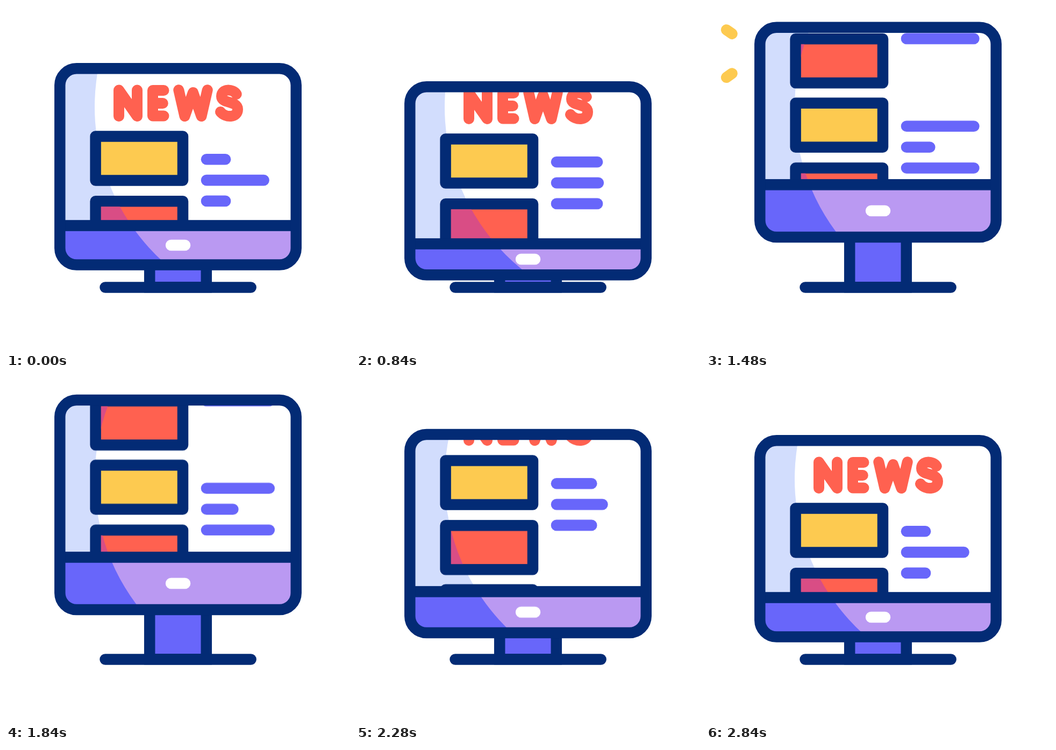
These frames come from a looping animation (640x640 px, 3000 ms). An HTML page without scripts:

```html
<!DOCTYPE html>
<html lang="en">
<head>
<meta charset="utf-8">
<title>NEWS</title>
<style>
  :root {
    --navy: #032b75; --purple: #6866fa; --lilac: #ba99f2; --ice: #d2ddfd;
    --red: #ff6150; --pink: #d94d85; --yellow: #fdca50;
  }
  html, body { margin: 0; width: 100%; height: 100%; overflow: hidden; background: #fff; }
  svg { display: block; width: 100vw; height: 100vh; }

  .frame, .shift, .scroll, .line, .spark path {
    animation: 3s cubic-bezier(.33, 0, .2, 1) infinite;
  }

  /* monitor: dips, jumps up, settles; its lower edge travels less than its top */
  .frame { x: 100.25px; y: 116.3px; width: 439.5px; height: 365.3px; rx: 31px; animation-name: frame; }
  @keyframes frame {
    0%, 6.67%, 89%, 100% { y: 116.3px; height: 365.3px; }
    25.33% { y: 156.3px; height: 347.8px; }
    49%, 59.33% { y: 39.8px; height: 390.3px; }
  }
  .shift { animation-name: shift; }
  .lift { --down: 40px; --up: -76.5px; }
  .button { --down: 31px; --up: -64px; }
  @keyframes shift {
    0%, 6.67%, 89%, 100% { transform: translateY(0); }
    25.33% { transform: translateY(var(--down)); }
    49%, 59.33% { transform: translateY(var(--up)); }
  }

  .scroll { animation-name: scroll; }
  @keyframes scroll {
    0%, 21%, 92.27%, 100% { transform: translateY(0); }
    64.3% { transform: translateY(-246px); }
  }

  .line {
    x: 362.7px; height: 20.6px; rx: 10.3px; fill: var(--purple);
    animation-name: line; animation-timing-function: cubic-bezier(.33, 0, .67, 1);
  }
  .short { --from: 55.7px; --to: 148.2px; }
  .long { --from: 127.2px; --to: 62.4px; }
  @keyframes line {
    0%, 6%, 89.8%, 100% { width: var(--from); }
    53.7% { width: var(--to); }
  }

  .spark { fill: none; stroke: var(--yellow); stroke-width: 20.4; stroke-linecap: round; }
  .spark path { opacity: 0; animation-name: spark; animation-timing-function: ease-in-out; }
  .late path { animation-delay: 78ms; }
  @keyframes spark {
    0%, 37.32% { opacity: 0; stroke-dasharray: 0 9; stroke-dashoffset: 0; }
    37.33% { opacity: 1; stroke-dasharray: 0 9; stroke-dashoffset: 0; }
    43.2% { opacity: 1; stroke-dasharray: 1 9; stroke-dashoffset: 0; }
    49% { opacity: 1; stroke-dasharray: 0 9; stroke-dashoffset: -1; }
    49.01%, 100% { opacity: 0; stroke-dasharray: 0 9; stroke-dashoffset: -1; }
  }

  .card { stroke: var(--navy); stroke-width: 20.5; stroke-linejoin: round; }
  .letters { fill: none; stroke: var(--red); stroke-width: 20; stroke-linecap: round; stroke-linejoin: round; }
</style>
</head>
<body>
<svg viewBox="0 0 640 640" role="img" aria-label="NEWS">
  <defs>
    <clipPath id="inside"><rect class="frame"/></clipPath>
    <clipPath id="shade">
      <path d="M0 0H213.4A389.2 389.2 0 0 0 351.1 520V640H0Z"/>
    </clipPath>
    <rect id="card" class="card" x="166.6" y="242.4" width="162.4" height="82"/>
    <rect id="tint" x="176.8" y="252.6" width="142" height="61.6" fill="var(--pink)"/>
    <rect id="panel" x="90" y="408" width="460" height="130"/>
  </defs>

  <g class="spark">
    <path pathLength="1" d="M568 68L602.5 44.5"/>
    <path pathLength="1" d="M568 109L602.5 132.5"/>
  </g>
  <g class="spark late">
    <path pathLength="1" d="M72 68L38 44.4"/>
    <path pathLength="1" d="M72 109L38 132.8"/>
  </g>

  <rect x="267.2" y="400" width="105.6" height="123.2" fill="var(--purple)" stroke="var(--navy)" stroke-width="20.5"/>
  <rect x="174.3" y="513.2" width="291.6" height="20.5" rx="10.25" fill="var(--navy)"/>

  <g clip-path="url(#inside)">
    <rect width="640" height="640" fill="#fff"/>
    <g clip-path="url(#shade)"><rect width="640" height="640" fill="var(--ice)"/></g>

    <g class="shift lift"><g class="scroll">
      <g class="letters">
        <path d="M210 205V156.5L244 205V156.5"/>
        <path d="M293.5 157H273V204.5H293.5M273 181H291.8"/>
        <path d="M321.3 156.3L332.5 205L348 161L363.5 205L374.7 156.3"/>
        <path d="M428.8 164C422 154 401 153 401 168C401 182 431 176 431 192C431 209 408 208 399 197"/>
      </g>
      <use href="#card" fill="var(--yellow)"/>
      <use href="#card" y="120.8" fill="var(--red)"/>
      <use href="#card" y="240.3" fill="var(--yellow)"/>
      <use href="#card" y="361" fill="var(--red)"/>
      <rect class="line short" y="274.9"/>
      <rect class="line long" y="313.8"/>
      <rect class="line short" y="352.6"/>
      <rect class="line short" y="515.5"/>
      <rect class="line long" y="554.4"/>
      <rect class="line short" y="593.2"/>
    </g></g>

    <g clip-path="url(#shade)">
      <g class="shift lift"><g class="scroll">
        <use href="#tint" y="120.8"/>
        <use href="#tint" y="361"/>
      </g></g>
    </g>

    <g class="shift lift"><use href="#panel" fill="var(--lilac)"/></g>
    <g clip-path="url(#shade)">
      <g class="shift lift"><use href="#panel" fill="var(--purple)"/></g>
    </g>
    <rect class="shift lift" x="90" y="398.2" width="460" height="20.6" fill="var(--navy)"/>
    <rect class="shift button" x="296.8" y="434.7" width="46.5" height="20.6" rx="10.3" fill="#fff"/>
  </g>
  <rect class="frame" fill="none" stroke="var(--navy)" stroke-width="20.5"/>
</svg>
</body>
</html>
```
